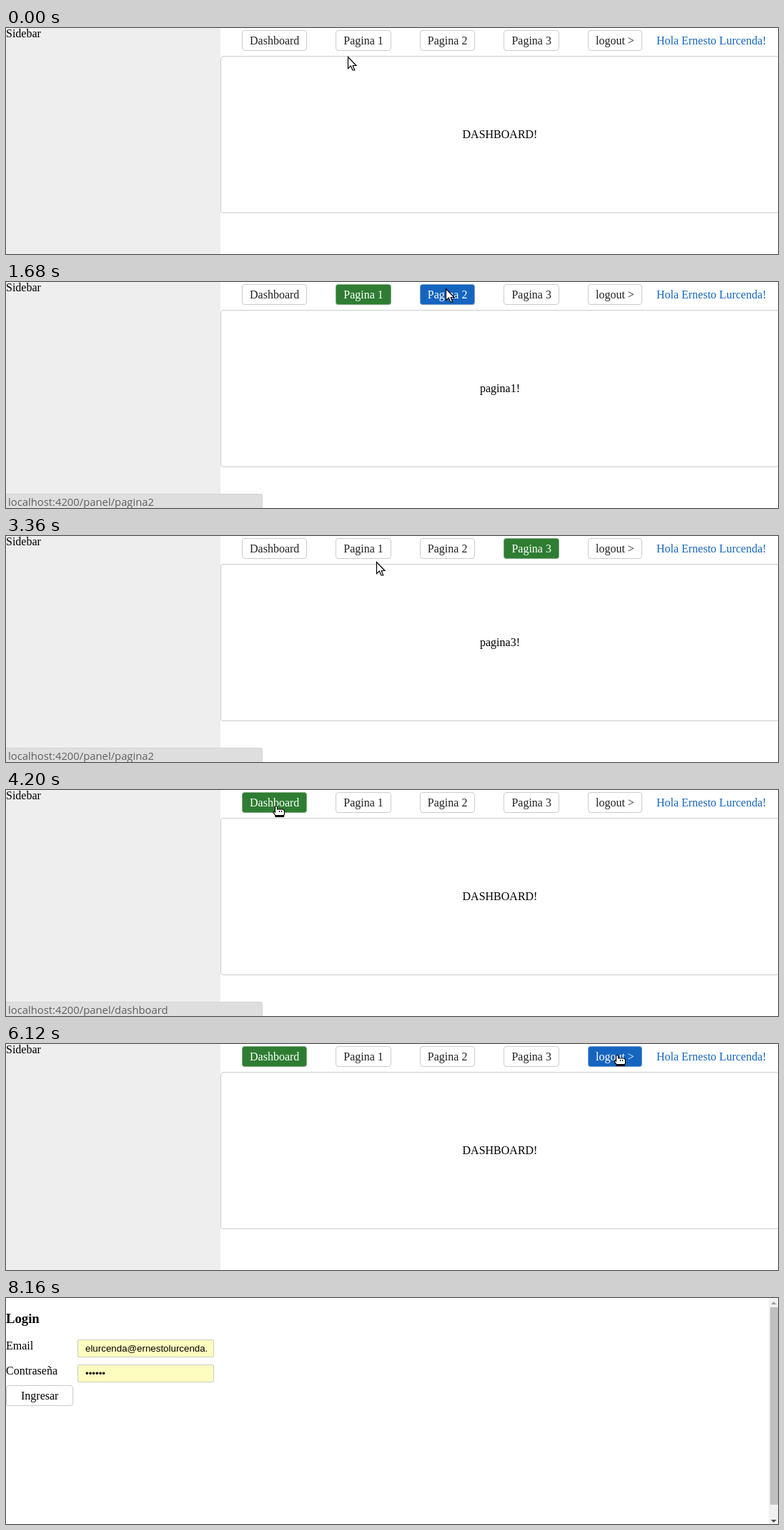
Animation, 1080 px wide and 316 px high, one loop 9.48 s. Source, as an HTML page:

```html
<!DOCTYPE html>
<html lang="es">
<head>
<meta charset="utf-8">
<title>Panel</title>
<style>
  * { box-sizing: border-box; }
  html, body { margin: 0; width: 100%; height: 100%; overflow: hidden; background: #fff; }
  body { position: relative; font: 16px "Liberation Serif", serif; color: #000; }
  body *, svg { position: absolute; white-space: nowrap; }
  svg * { position: static; }
  [hidden] { display: none !important; }
  #panel, #login { left: 0; top: 0; width: 1080px; height: 316px; overflow: hidden; }
  aside { width: 300px; height: 316px; background: #eee; line-height: 15px; }
  nav { left: 310px; top: 3px; display: flex; line-height: 27px; }
  nav * { position: static; flex: none; }
  .btn { height: 29px; padding: 0 10px; border: 1px solid #ccc; border-radius: 4px; color: #212121; }
  nav .btn { margin: 0 20px; }
  nav .hover, nav .active { background: #1565c0; border-color: #ccc8; color: #fff; }
  nav .active { background: #2e7d32; }
  #user { color: #1565c0; padding-top: 1px; }
  main { left: 300px; top: 39px; width: 782px; height: 220px; border: 1px solid #ccc;
    border-radius: 4px; line-height: 217px; text-align: center; }
  #status { left: 0; top: 296px; width: 359px; height: 20px; padding-left: 3px; background: #dedede;
    border: solid #d6d6d6; border-width: 1px 1px 0 0; border-radius: 0 3px 0 0;
    font: 14.8px/20px "Open Sans", sans-serif; color: #606060; }
  h3 { margin: 0; top: 18px; font-size: 18.72px; line-height: 21px; }
  label { line-height: 17px; }
  .field { left: 100px; width: 191px; height: 25px; padding: 0 10px; border: 1px solid #ccc; border-radius: 2px;
    font: 13.333px/23px "Liberation Sans", sans-serif; }
  .field span { width: 170px; height: 23px; overflow: hidden; visibility: hidden; }
  .filled .field { background: #fdfdbf; }
  .filled span { visibility: visible; }
  #login .btn { top: 122px; padding: 0 20px; line-height: 27px; color: #000; }
  #bar { left: 1067px; width: 13px; height: 316px; background: #f1f1f1; }
  #thumb { left: 2px; top: 13px; width: 11px; height: 276px; background: #c0c0c0; }
  #cursor { left: 0; top: 0; overflow: visible; }
</style>
</head>
<body>
<div id="panel">
  <aside>Sidebar</aside>
  <nav>
    <a class="btn">Dashboard</a><a class="btn">Pagina 1</a><a class="btn">Pagina 2</a><a class="btn">Pagina 3</a><a class="btn">logout &gt;</a>
    <span id="user">Hola Ernesto Lurcenda!</span>
  </nav>
  <main id="content"></main>
  <div id="status"></div>
</div>
<div id="login" hidden>
  <h3>Login</h3>
  <label style="top:58px">Email</label>
  <div class="field" style="top:58px"><span>elurcenda@ernestolurcenda.</span></div>
  <label style="top:93px">Contraseña</label>
  <div class="field" style="top:93px"><span>••••••</span></div>
  <div class="btn">Ingresar</div>
  <div id="bar">
    <div id="thumb"></div>
    <svg width="13" height="316"><path d="M3 9h8l-4-4z" fill="#a3a3a3"/><path d="M3 310h8l-4 4z" fill="#505050"/></svg>
  </div>
</div>
<svg id="cursor" width="1" height="1">
  <path id="arrow" d="M-.5.5V16.6L3.3 13.1L6 19H8.7L6.2 12.5H11Z" fill="#fff" stroke="#000" stroke-width="1.2"/>
  <g id="hand" stroke="#000" fill="#fff" stroke-width="1.2">
    <path d="M-3.5 9V1.5Q-2-.5-.5 1.5V5H7Q9.5 5.5 9.5 8V12L8.5 13.5H-3L-6 9.5Q-6 7.5-3.5 9Z"/>
    <path d="M2.5 7v2M5.5 7v2"/>
    <path d="M-3 13.5H8.5V15.5H-3Z" fill="#000"/>
  </g>
</svg>
<script>
const LOOP = 9480, STEP = 120, LOGIN = 6360, LOGOUT = 4;
const $ = id => document.getElementById(id);
const buttons = [...document.querySelectorAll('nav .btn')];
const rects = buttons.map(b => b.getBoundingClientRect());
const pages = ['dashboard', 'pagina1', 'pagina2', 'pagina3'];
const clicks = [840, 1920, 3000, 4200];

const start = [479, 40];
const moves = [
  { from: 0, to: 120, x: 495, y: 14 },
  { from: 1080, to: 1680, x: 616, y: 9 },
  { from: 2160, to: 2640, x: 724, y: 9 },
  { from: 3120, to: 4080, x: 380, y: 22, sag: 20.4 },
  { from: 4800, to: 5400, x: 1016, y: 50, sag: 40 },
  { from: 5400, to: 5760, x: 885, y: 58 },
  { from: 5760, to: 6120, x: 857, y: 15 },
  { from: LOGIN, to: 6840, x: 583, y: 179 },
  { from: 7800, to: 8160, x: 830, y: -24 }
];

const easeOut = u => 1 - (1 - u) ** 3.15;

function cursorAt(t) {
  let [x, y] = start;
  for (const m of moves) {
    if (t < m.from) break;
    const e = easeOut(Math.min(1, (t - m.from) / (m.to - m.from)));
    x += (m.x - x) * e;
    y += (m.y - y) * e + (m.sag || 0) * Math.sin(Math.PI * e);
  }
  return [Math.floor(x + .01), Math.floor(y + .01)];
}

function hoverAt(t) {
  const [x, y] = cursorAt(t);
  return rects.findIndex(r => x >= r.left && x < r.right && y >= r.top && y < r.bottom);
}

// The address lingers for two steps after the pointer leaves a link.
function linkAt(t) {
  const recent = [0, 1, 2].map(k => hoverAt(t - k * STEP));
  return pages[recent.find(i => i >= 0)];
}

function draw() {
  const t = Math.floor(performance.now() % LOOP / STEP) * STEP;
  const [x, y] = cursorAt(t);
  const over = hoverAt(t), link = linkAt(t), login = t >= LOGIN;
  const clicked = clicks.filter(c => c <= t).length;
  const page = clicked % pages.length;
  const active = clicked ? page : -1;

  buttons.forEach((b, i) => {
    b.classList.toggle('hover', i === over);
    b.classList.toggle('active', i === active);
  });
  $('content').textContent = (page ? pages[page] : 'DASHBOARD') + '!';
  $('status').hidden = !link;
  $('status').textContent = 'localhost:4200/panel/' + link;

  $('panel').hidden = login;
  $('login').hidden = !login;
  $('login').classList.toggle('filled', t > LOGIN);

  const hand = !login && over >= 0 && (over === active || over === LOGOUT);
  $('cursor').style.transform = `translate(${x}px,${y}px)`;
  $('hand').style.display = hand ? '' : 'none';
  $('arrow').style.display = hand ? 'none' : '';
  requestAnimationFrame(draw);
}
draw();
</script>
</body>
</html>
```
